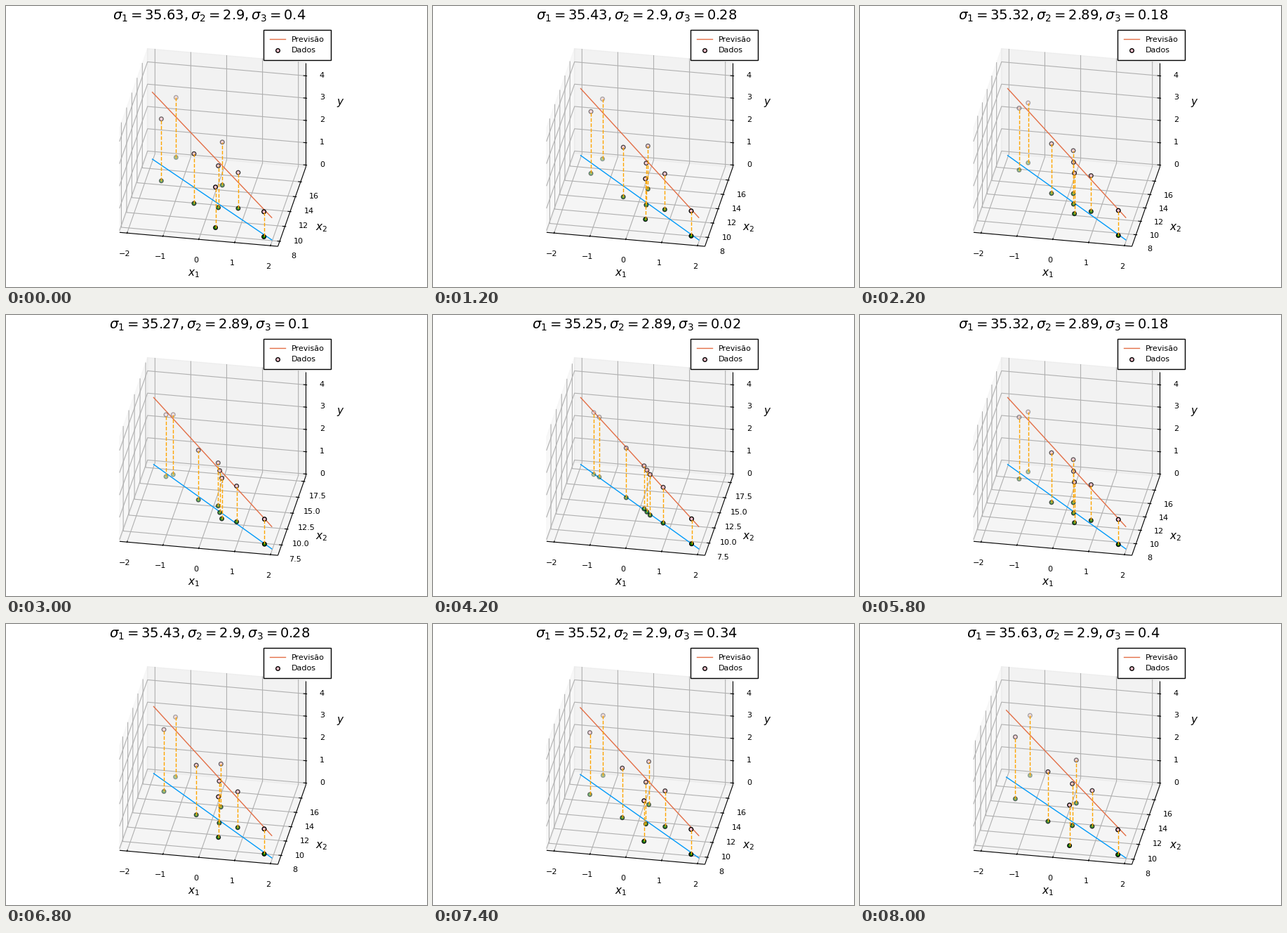
These frames come from a looping animation (600x400 px, 8.2 s). A matplotlib script:

```python
import numpy as np
import matplotlib.pyplot as plt
from matplotlib.animation import FuncAnimation
from matplotlib.lines import Line2D

W, H, DPI = 600, 400, 100
FRAMES, INTERVAL = 41, 200
BLUE, CORAL = "#009AFA", "#E36F47"

# Orthographic camera: normalised box coordinates run from -0.5 to 0.5
AZIM, ELEV = np.radians([-80, 30])
SIDE = 219.93
BOX = SIDE * np.array([1, 1, 0.75])
RIGHT = np.array([-np.sin(AZIM), np.cos(AZIM), 0])
UP = np.array([-np.sin(ELEV) * np.cos(AZIM), -np.sin(ELEV) * np.sin(AZIM), np.cos(ELEV)])
NEAR = np.cross(RIGHT, UP)
CENTER = np.array([294.6, 201.4])
EDGE = 0.5 + 1 / 48

# x2 = 12 - 3 x1 + level * noise, y = 2 - x1 / 2
X1 = np.array([-1.551, -1.376, -0.452, 0.14, 0.246, 0.361, 0.791, 1.758])
NOISE = np.array([-2.40, 1.35, -1.67, 2.81, 0.15, -2.15, 1.92, 1.41])
Y = 2 - X1 / 2
ENDS = np.array([-2.0, 2.0])
X_SPAN, Z_MAX = 4.24, 4.5

fig = plt.figure(figsize=(W / DPI, H / DPI), dpi=DPI, facecolor="white")
ax = fig.add_axes([0, 0, 1, 1])


def project(u, v, w):
    p = np.stack(np.broadcast_arrays(u, v, w), axis=-1) * BOX
    return CENTER[0] + p @ RIGHT, CENTER[1] - p @ UP


def nearness(u, v, w):
    d = np.stack(np.broadcast_arrays(u, v, w), axis=-1) * BOX @ NEAR
    return (d - d.min()) / (d.max() - d.min())


def path(points, **style):
    ax.plot(*project(*np.array(points, float).T), **style)


def label(x, y, text, size=8, va="center"):
    ax.text(x, y, text, size=size, ha="center", va=va)


def pane(corners, shade):
    ax.fill(*project(*np.array(corners).T), facecolor=shade, edgecolor=shade,
            alpha=0.5, linewidth=1, zorder=0)


def grid(points):
    path(points, color="#b0b0b0", lw=0.8, zorder=1)


def axis_line(points):
    path(points, color="black", lw=0.8, zorder=1.5, solid_capstyle="butt")


def draw_box(v_ticks):
    e = EDGE
    pane([(-e, -e, -e), (-e, e, -e), (-e, e, e), (-e, -e, e)], "0.95")
    pane([(-e, e, -e), (e, e, -e), (e, e, e), (-e, e, e)], "0.90")
    pane([(-e, -e, -e), (e, -e, -e), (e, e, -e), (-e, e, -e)], "0.925")

    inner, outer = e - 0.2 / 12, e + 0.1 / 12
    for k in range(-2, 3):
        u = k / X_SPAN
        grid([(u, -e, -e), (u, e, -e), (u, e, e)])
        axis_line([(u, -inner, -e), (u, -outer, -e)])
        x, y = project(u, -e, -e)
        label(x - 3.5, y + 29.5, str(k).replace("-", "\u2212"))
    for text, v in v_ticks:
        grid([(e, v, -e), (-e, v, -e), (-e, v, e)])
        axis_line([(inner, v, -e), (outer, v, -e)])
        x, y = project(e, v, -e)
        label(x + 19.4, y + 20.8, text)
    for k in range(5):
        w = k / Z_MAX - 0.5
        grid([(e, e, w), (-e, e, w), (-e, -e, w)])
        axis_line([(inner, e, w), (outer, e, w)])
        x, y = project(e, e, w)
        label(x + 23, y - 0.8, str(k))

    axis_line([(-e, -e, -e), (e, -e, -e)])
    axis_line([(e, -e, -e), (e, e, -e)])
    axis_line([(e, e, -e), (e, e, e)])
    label(268, 381, "$x_1$", 11)
    label(450, 316.5, "$x_2$", 11)
    label(476.5, 137.5, "$y$", 11)


def draw_points(u, v, w, color, zorder):
    alpha = 0.3 + 0.7 * nearness(u, v, w)
    face = [(*plt.matplotlib.colors.to_rgb(color), a) for a in alpha]
    edge = [(0, 0, 0, a) for a in alpha]
    ax.scatter(*project(u, v, w), s=16, c=face, edgecolors=edge, linewidths=1, zorder=zorder)


def draw_legend():
    handles = [
        Line2D([], [], color=CORAL, lw=1, label="Previsão"),
        Line2D([], [], color="none", marker="o", ms=4, mfc="pink", mec="black",
               mew=1, label="Dados"),
    ]
    box = ax.legend(handles=handles, loc="upper right", bbox_to_anchor=(462.5, 34),
                    bbox_transform=ax.transData, borderaxespad=0, borderpad=0.8,
                    fontsize=8, fancybox=False, framealpha=1, edgecolor="black")
    box.set_zorder(10)


def draw_title(level):
    s1 = round(35.247 + 0.379 * level**2, 2)
    s2 = round(2.89 + 0.012 * level**2, 2)
    s3 = round(0.4 * level, 2)
    label(289.8, 20, rf"$\sigma_1 = {s1}, \sigma_2 = {s2}, \sigma_3 = {s3}$", 14, "baseline")


def update(i):
    level = abs(20 - i) / 20
    ax.clear()
    ax.set(xlim=(0, W), ylim=(H, 0))
    ax.axis("off")

    x2 = 12 - 3 * X1 + level * NOISE
    fit = 12 + 0.4 * level - (3 - 0.71 * level) * ENDS
    values = np.concatenate([x2, fit])
    low, high = values.min(), values.max()

    def norm(value):
        return (value - (low + high) / 2) / (1.06 * (high - low))

    if level < 0.32:
        ticks = [(f"{t:.1f}", norm(t)) for t in np.arange(7.5, 18, 2.5)]
    else:
        ticks = [(str(t), norm(t)) for t in range(8, 17, 2)]
    draw_box(ticks)

    u, v, w = X1 / X_SPAN, norm(x2), Y / Z_MAX - 0.5
    ue, ve = ENDS / X_SPAN, norm(fit)
    ax.plot(*project(ue, ve, -0.5), color=BLUE, lw=1, zorder=2)
    ax.plot(*project(ue, ve, (2 - ENDS / 2) / Z_MAX - 0.5), color=CORAL, lw=1, zorder=2)
    draw_points(u, v, -0.5, "green", 3)
    draw_points(u, v, w, "pink", 4)
    for a, b, c in zip(u, v, w):
        path([(a, b, -0.5), (a, b, c)], color="orange", lw=1, ls="--", zorder=5)

    draw_legend()
    draw_title(level)


anim = FuncAnimation(fig, update, frames=FRAMES, interval=INTERVAL,
                     init_func=lambda: None, repeat=True, repeat_delay=0)
plt.show()
```
